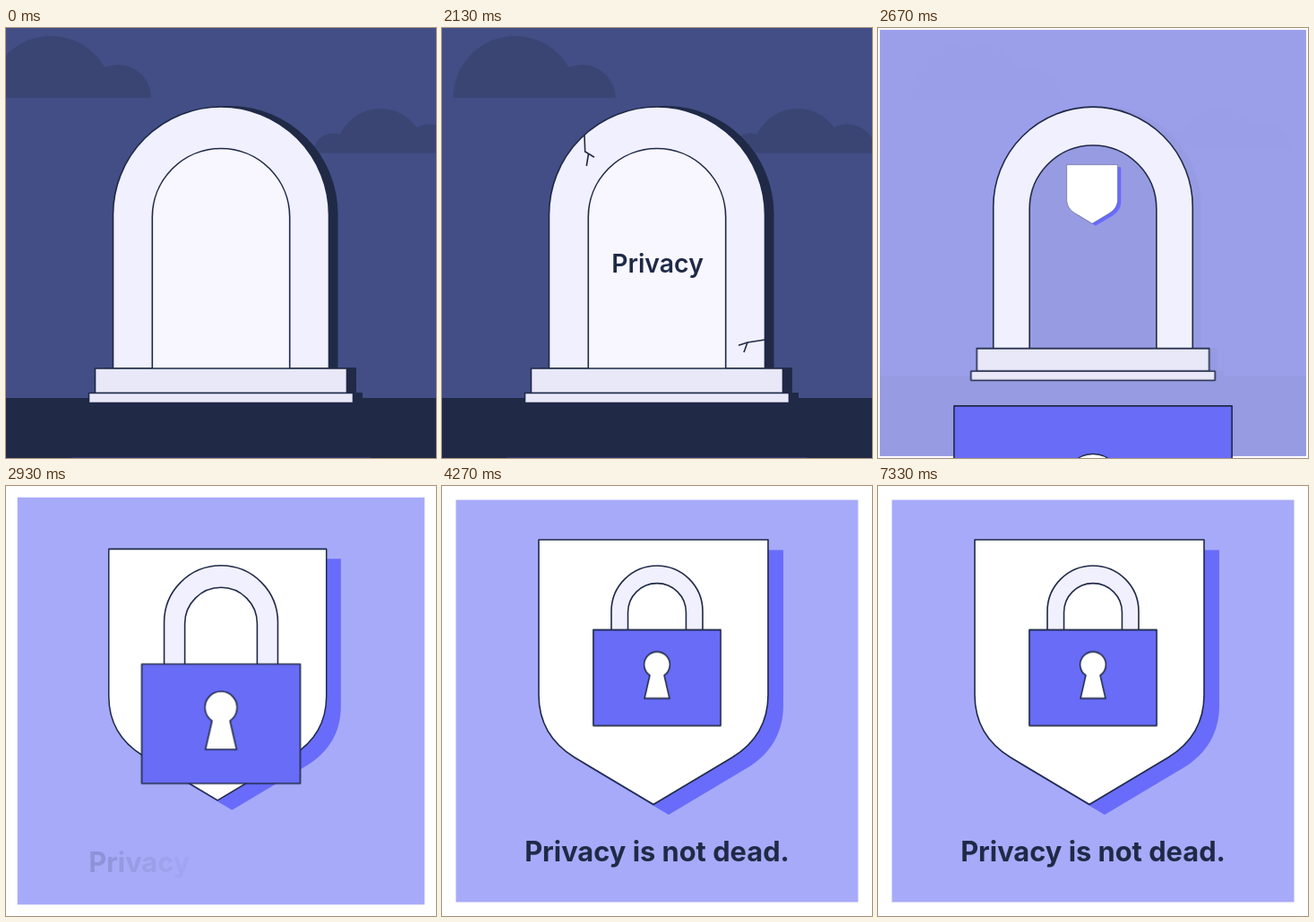
These frames come from a looping animation (480x480 px, 7990 ms). An HTML page:

```html
<!DOCTYPE html>
<html lang="en">
<head>
<meta charset="utf-8">
<title>Privacy is not dead</title>
<style>
  @property --p { syntax: "<number>"; inherits: true; initial-value: 0; }

  html, body { margin: 0; width: 100%; height: 100%; overflow: hidden; background: #fff; }

  svg {
    --loop: 7990ms;
    display: block; width: 100%; height: 100%;
    animation: morph var(--loop) infinite;
  }

  /* --p runs 0 to 1 while the tombstone turns into the padlock */
  @keyframes morph {
    0%, 28.348% { --p: 0; animation-timing-function: cubic-bezier(.77, 0, .1, 1); }
    43.367%, 100% { --p: 1; }
  }

  .scene {
    transform-origin: 240px 88px;
    transform: translateY(calc(var(--p) * 1px)) scale(calc(1 - .577 * var(--p)));
  }
  .body { transform: translateY(calc(479px - 222px * var(--p))); }
  .frame { fill: none; stroke: #fff; stroke-width: calc(31px * var(--p)); }
  .shield {
    transform:
      translate(240px, calc(174px + 1px * var(--p) * (94.7 - 60.7 * var(--p))))
      scale(calc(var(--p) * (1.75 - var(--p) * (.6 + .15 * var(--p)))));
  }

  .line { fill: none; stroke: #1f2a47; stroke-width: 1.6; stroke-linejoin: round; }
  .scene .line { vector-effect: non-scaling-stroke; }
  .stone { fill: #f1f0fe; }
  .base { fill: #e9e8f8; }
  .lock { fill: #686cf6; }
  .white { fill: #fff; }
  .dark { fill: #202a47; }

  .cloud { fill: #3a4574; animation: drift var(--loop) linear infinite; }
  @keyframes drift { to { transform: translateX(var(--dx)); } }

  .day { fill: #a7aaf8; animation: dawn var(--loop) linear infinite; }
  @keyframes dawn { 0%, 30.39% { opacity: 0; } 33.83%, 100% { opacity: 1; } }

  .detail { animation: vanish var(--loop) linear infinite; }
  @keyframes vanish { 0%, 30.663% { opacity: 1; } 33.354%, 100% { opacity: 0; } }

  .crack {
    fill: none; stroke: #1f2a47; stroke-width: 1.6; stroke-dasharray: 1 2;
    animation: crack var(--loop) linear infinite;
  }
  @keyframes crack {
    0%, 12.5% { stroke-dashoffset: 1.1; }
    17.5%, 100% { stroke-dashoffset: 0; }
  }

  text {
    font-family: Inter, "Open Sans", sans-serif;
    fill: #1f2a47; text-anchor: middle; white-space: pre;
  }
  tspan { animation: var(--show) var(--loop) linear calc(var(--i) * 8ms) infinite both; }
  .title { --show: title; font-size: 28.4px; font-weight: 600; }
  .claim {
    --show: claim; font-size: 30.8px; font-weight: 700;
    transform: translateY(calc(70px - 70px * var(--p)));
    animation: gate var(--loop) step-end infinite;
  }
  @keyframes title { 0%, 5% { fill-opacity: 0; } 9.25%, 60% { fill-opacity: 1; } 61%, 100% { fill-opacity: 0; } }
  @keyframes claim { 0%, 35.92% { fill-opacity: 0; } 40.175%, 100% { fill-opacity: 1; } }
  @keyframes gate { 0% { opacity: 0; } 35%, 100% { opacity: 1; } }
</style>
</head>
<body>
<svg viewBox="0 0 480 480">
  <defs>
    <path id="arch" d="M119.5 380V208.5a120.5 120.5 0 0 1 241 0V380z"/>
    <path id="crest" d="M-132-148H124V25C124 56 110 79 84 95L-4 147.5L-92 95C-118 79-132 56-132 25z"/>
  </defs>

  <rect width="480" height="480" fill="#424e85"/>
  <g class="scene">
    <path class="cloud" style="--dx:118px" d="M-19 78a69 69 0 0 1 138 0zM88 78a37 37 0 0 1 74 0z"/>
    <path class="cloud" style="--dx:-79px" d="M368.5 139.5a49.5 49.5 0 0 1 99 0zM441.5 139.5a32 32 0 0 1 64 0zM343 139.5a22 22 0 0 1 44 0z"/>
    <g class="dark">
      <rect x="-400" y="413" width="1280" height="800"/>
      <use href="#arch" x="10" y="-1"/>
      <rect x="110" y="379" width="281" height="30"/>
      <rect x="103" y="407" width="295" height="11"/>
    </g>
  </g>

  <rect class="day" width="480" height="480"/>
  <rect class="frame" width="480" height="480"/>

  <g class="scene">
    <g class="detail">
      <path fill="#f8f7ff" d="M163.3 380V211.2a76.7 76.7 0 0 1 153.4 0V380z"/>
      <text class="title" x="240.5" y="273">Privacy</text>
    </g>
  </g>

  <g class="shield">
    <use href="#crest" x="17" y="11.5" fill="#696cfa"/>
    <use href="#crest" class="line white"/>
  </g>

  <g class="scene">
    <path class="line stone" d="M119.5 380V208.5a120.5 120.5 0 0 1 241 0V380H316.7V211.2a76.7 76.7 0 0 0-153.4 0V380z"/>
    <g class="detail">
      <path class="crack" pathLength="1" d="M159 119L159.7 138L170 144.2"/>
      <path class="crack" pathLength="1" d="M163.5 140.5L161.3 154"/>
      <path class="crack" pathLength="1" d="M360.5 348L341 351L331 354.2"/>
      <path class="crack" pathLength="1" d="M341 351L337 362"/>
    </g>
    <rect class="line base" x="99.5" y="380" width="281" height="27.5"/>
    <rect class="line base" x="92.5" y="407.5" width="295" height="11"/>
    <g class="body">
      <rect class="line lock" x="72" width="336" height="253"/>
      <path class="line white" d="M221 120.2A34 34 0 1 1 259 120.2L273 181H207z"/>
    </g>
  </g>

  <text class="claim" x="240" y="418.7">Privacy is not dead.</text>
</svg>
<script>
  // One tspan per letter, so that each can fade in after the one before
  for (const text of document.querySelectorAll("text")) {
    text.innerHTML = [...text.textContent]
      .map((ch, i) => `<tspan style="--i:${i}">${ch}</tspan>`)
      .join("");
  }
</script>
</body>
</html>
```
